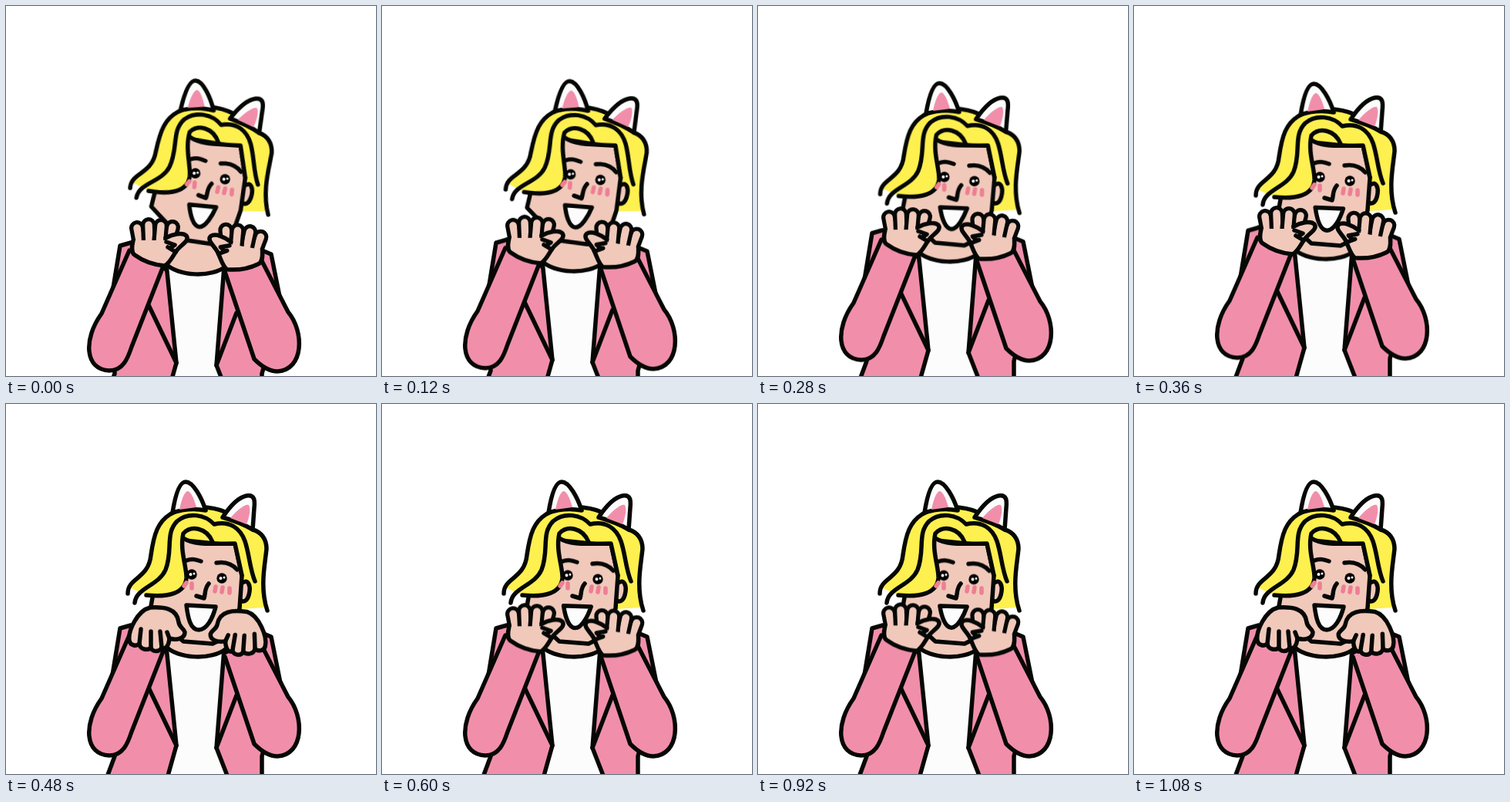
An HTML page for the animation above (1120 ms loop, 480 by 480 pixels).

```html
<!DOCTYPE html>
<html lang="en">
<head>
<meta charset="utf-8">
<title>Cat paws</title>
<style>
  html, body { margin: 0; width: 100%; height: 100%; overflow: hidden; background: #fff; }
  svg { display: block; width: 100vw; height: 100vh; }
  .ink { stroke: #060806; stroke-width: 5.5; stroke-linecap: round; stroke-linejoin: round; }
  .line { fill: none; }
  .pink { fill: #f18fab; }
  .skin { fill: #f0c9bb; }
  .hair { fill: #fef04f; }
  .white { fill: #fcfcfc; }
  .blush { fill: none; stroke: #ee7f93; stroke-width: 5.5; stroke-linecap: round; }
  .rim { stroke-width: 20; }
  .core { stroke: #f0c9bb; stroke-width: 9.5; }

  .torso, .arms, .head, .look, .mouth, .bob, .up, .down { animation: 1120ms linear infinite; }
  .torso { animation-name: torso; }
  .arms { animation-name: arms; }
  .head { animation-name: head; transform-origin: 300px 285px; }
  .look { animation-name: look; }
  .mouth { animation-name: mouth; }
  .bob { animation-name: bob; }
  .up { animation-name: up; animation-timing-function: step-end; }
  .down { animation-name: down; animation-timing-function: step-end; }

  /* The body rises during the first 400 ms, then holds */
  @keyframes torso {
    0% { transform: translateY(20px); animation-timing-function: ease-in-out; }
    35.7%, 100% { transform: none; }
  }
  @keyframes arms {
    0% { transform: translateY(17px); animation-timing-function: ease-in-out; }
    35.7%, 100% { transform: none; }
  }
  @keyframes head {
    0% { transform: rotate(4deg); animation-timing-function: ease-in-out; }
    35.7%, 100% { transform: rotate(0deg); }
  }

  /* The face follows the paws */
  @keyframes look {
    0%, 42.9%, 69.6%, 96.4%, 100% { transform: none; }
    25%, 56.3%, 83% { transform: translateY(1.5px); }
  }
  @keyframes mouth {
    42.9%, 69.6%, 96.4%, 100% { d: path("M234 261L272 263C268 279 260 293 250 293C239 293 236 277 234 261Z"); }
    0%, 25%, 56.3%, 83% { d: path("M236 262L271 263C267 274 259 290 251 290C243 290 238 275 236 262Z"); }
  }
  @keyframes bob {
    0%, 28%, 42.9%, 56.3%, 69.6%, 83%, 96.4%, 100% { transform: none; }
    35.7%, 50%, 62.5%, 76.8%, 89.3% { transform: translateY(3px); }
  }
  @keyframes up {
    0%, 50%, 76.8% { visibility: visible; }
    35.7%, 62.5%, 89.3%, 100% { visibility: hidden; }
  }
  @keyframes down {
    0%, 50%, 76.8% { visibility: hidden; }
    35.7%, 62.5%, 89.3%, 100% { visibility: visible; }
  }
</style>
</head>
<body>
<svg viewBox="0 0 480 480">
  <defs>
    <g id="finger1"><path class="rim" d="M170 271L174 292"/><path class="core" d="M170 271L174 292"/></g>
    <g id="finger2"><path class="rim" d="M185 267L186 292"/><path class="core" d="M185 267L186 292"/></g>
    <g id="finger3"><path class="rim" d="M201 268L199 292"/><path class="core" d="M201 268L199 292"/></g>
    <g id="finger4"><path class="rim" d="M216 270L211 288"/><path class="core" d="M216 270L211 288"/></g>
    <g id="pawUp" class="ink skin">
      <use href="#finger1"/>
      <use href="#finger4"/>
      <use href="#finger2"/>
      <use href="#finger3"/>
      <path stroke="none" d="M165 287H221L220 302L206 320C193 319 177 314 166 305Z"/>
      <path class="line" d="M165 287C163 296 162 303 167 306C178 314 193 319 206 320C213 316 217 306 221 301"/>
      <path d="M207 284C216 279 229 276 234 281C239 288 226 293 220 302L210 296"/>
      <path class="line" d="M208 289L219 293L213 297"/>
    </g>
    <g id="pawDown" class="ink skin">
      <path d="M187 264C170 268 158 295 160 307C161 313 169 315 173 311C174 319 184 320 188 316C190 322 199 322 202 316C206 319 211 315 212 304C222 307 232 304 232 296C230 290 225 290 224 283C222 265 205 263 187 264Z"/>
      <path class="line" d="M173 311L175 292M188 316V295M202 316L200 295M212 304L209 296"/>
    </g>
  </defs>

  <g class="torso ink">
    <path class="pink" d="M162 287L148 291L138 352L141 457L125 500H332V457L357 367L344 302L332 297L285 322H208Z"/>
    <path class="white" d="M208 315L221 443L205 500H294L273 446L283 318Z"/>
    <path class="line" d="M185 368L221 443M299 378L273 446"/>
    <path class="skin" stroke="none" d="M212 285L207 314C222 331 268 333 286 317L284 285Z"/>
    <path class="line" d="M207 314C222 331 268 333 286 317"/>
  </g>

  <g class="head ink">
    <path class="hair" stroke="none" d="M213 143C234 131 265 131 287 141L320 163C331 166 338 175 338 188C336 208 330 238 337 264L304 266L290 190L229 180Z"/>
    <path class="skin" d="M307 232C314 226 317 236 316 243C314 258 306 258 303 253"/>
    <path class="skin" d="M229 174L297 181L306 223L303 265L294 298L268 311L230 308L187 268L192 240Z"/>
    <path class="hair" stroke="none" d="M160 238C166 222 186 226 188 196C192 168 197 153 213 143L268 138L297 181L230 174C225 192 235 213 234 226C232 246 210 251 182 248Z"/>
    <path class="hair" stroke="none" d="M250 140L282 140L320 163L321 225L305 220L297 181Z"/>
    <g class="line">
      <path d="M158 246C158 225 185 227 188 196C192 168 197 153 213 143C234 131 265 131 287 141L320 163C331 166 338 175 338 188C336 208 329 238 339 268"/>
      <path d="M167 258C169 238 198 236 207 215C217 190 206 168 222 152C236 140 258 143 270 156C290 151 304 161 310 178C316 196 316 213 323 230"/>
      <path d="M182 248C210 251 232 246 234 226C235 213 225 190 230 168C240 157 260 160 268 179"/>
      <path d="M230 174C245 184 268 181 297 181L306 222"/>
    </g>

    <path class="white" d="M216 141C219 122 224 101 233 101C243 101 254 122 259 138C244 135 228 137 216 141Z"/>
    <path class="pink" stroke="none" d="M225 137C228 122 232 113 236 113C240 114 244 123 247 134Z"/>
    <path class="white" d="M281 147C291 132 302 121 312 119C323 117 323 126 322 135L320 163C309 156 295 151 281 147Z"/>
    <path class="pink" stroke="none" d="M291 148C300 137 311 129 315 131C318 137 315 149 312 156Z"/>

    <path class="blush" d="M231 236L234 232M241 233V239M272 237L271 243M281 238L280 244M290 239V245"/>
    <g class="look">
      <path class="line" d="M234 203C241 200 247 202 253 204M273 206C285 204 294 208 300 215"/>
      <g stroke="none">
        <circle cx="241" cy="221" r="6.700"/>
        <circle cx="280" cy="226" r="6.700"/>
        <g fill="#fff">
          <circle cx="239.500" cy="221" r="2"/>
          <circle cx="244" cy="220" r="1.500"/>
          <circle cx="278.500" cy="226" r="2"/>
          <circle cx="283" cy="225" r="1.500"/>
        </g>
      </g>
    </g>
    <path class="line" d="M263 233C257 240 259 246 257 252L247 249"/>
    <path class="mouth white" d="M234 261L272 263C268 279 260 293 250 293C239 293 236 277 234 261Z"/>
  </g>

  <g class="arms">
    <g class="ink pink">
      <path d="M160 300L124 382C100 415 102 455 134 456C152 456 158 440 163 425L205 318"/>
      <path d="M331 312L366 380C387 405 387 455 352 457C340 457 330 449 322 441L284 328"/>
    </g>
    <g class="bob">
      <g class="up">
        <use href="#pawUp"/>
        <use href="#pawUp" transform="translate(1) rotate(10 262 285) translate(498) scale(-1 1)"/>
      </g>
      <g class="down">
        <use href="#pawDown"/>
        <use href="#pawDown" transform="translate(0 2) rotate(4 262 285) translate(498) scale(-1 1)"/>
      </g>
    </g>
  </g>
</svg>
</body>
</html>
```
